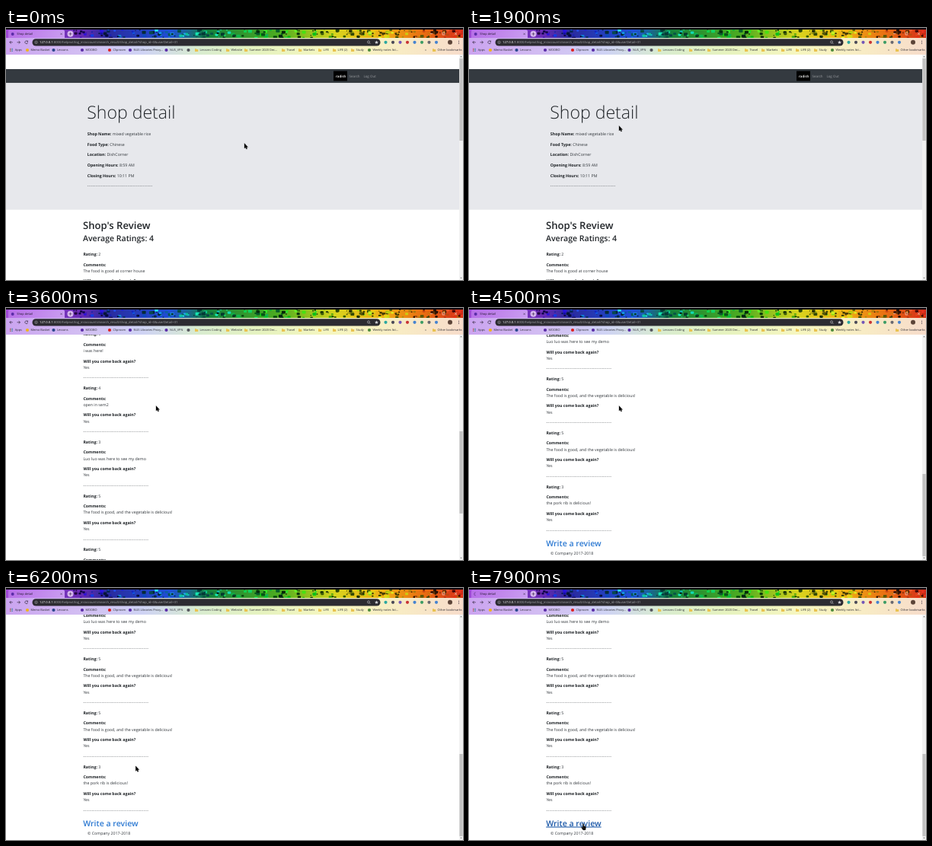
These frames come from a looping animation (600x331 px, 8 s). An HTML page:

```html
<!DOCTYPE html>
<html lang="en">
<head>
<meta charset="utf-8">
<title>Shop detail</title>
<style>
  html, body { margin: 0; width: 100%; height: 100%; overflow: hidden; background: #fff; }
  svg { display: block; width: 100vw; height: 100vh; }
  text { font-family: "Open Sans", "Noto Sans", sans-serif; font-size: 5.27px; fill: #30353a; text-rendering: geometricPrecision; }
  .b { font-weight: 700; fill: #1c2024; }
  .title { font-size: 23.1px; font-weight: 300; fill: #212529; }
  .h1 { font-size: 13.1px; font-weight: 600; fill: #212529; }
  .h2 { font-size: 10.55px; font-weight: 600; fill: #212529; }
  .dash { letter-spacing: .51px; }
  .nav { font-size: 4.45px; fill: #9a9da0; }
  .user { font-size: 4.45px; font-weight: 600; fill: #fff; }
  .tab { font-size: 4px; fill: #241a30; }
  .mark { font-size: 3.9px; fill: #2c2c34; }
  .url { font-size: 4.2px; fill: #a5a7ab; }
  .host { fill: #fff; }
</style>
</head>
<body>
<svg viewBox="0 0 600 331" preserveAspectRatio="none">
  <defs>
    <clipPath id="view"><rect y="35" width="600" height="296"/></clipPath>
    <linearGradient id="rainbow">
      <stop offset="0" stop-color="#a04ad8"/><stop offset=".16" stop-color="#6a2cb4"/>
      <stop offset=".22" stop-color="#2a2a9c"/><stop offset=".36" stop-color="#1f4fd8"/>
      <stop offset=".44" stop-color="#14803c"/><stop offset=".6" stop-color="#4fae20"/>
      <stop offset=".72" stop-color="#d8d41e"/><stop offset=".82" stop-color="#eeb014"/>
      <stop offset=".91" stop-color="#ea7012"/><stop offset="1" stop-color="#d42a18"/>
    </linearGradient>
    <linearGradient id="pastel">
      <stop offset="0" stop-color="#cba4f0"/><stop offset=".16" stop-color="#d2bdf2"/>
      <stop offset=".3" stop-color="#cfd3f4"/><stop offset=".42" stop-color="#d8ecd0"/>
      <stop offset=".56" stop-color="#e6f3bf"/><stop offset=".72" stop-color="#f6f6c0"/>
      <stop offset=".86" stop-color="#f8ecc4"/><stop offset="1" stop-color="#f7dccb"/>
    </linearGradient>
    <linearGradient id="tabFill">
      <stop offset="0" stop-color="#b870e8"/><stop offset="1" stop-color="#c99cf0"/>
    </linearGradient>
  </defs>
  <rect width="600" height="331" fill="#fff"/>
  <g clip-path="url(#view)"><g id="page"></g></g>
  <g id="scrollbar"></g>
  <g id="browser"></g>
  <path id="arrow" d="M0 0V6.6L1.5 5.3L2.5 7.6L3.7 7.1L2.7 4.9H4.6Z" fill="#000" stroke="#000" stroke-width=".3"/>
  <path id="hand" d="M-.5-3.6Q.3-4.3 .8-3.5V-.9L3-.3Q3.7 0 3.5 1L2.9 4.4H-.2L-2.5 1.2Q-2.4 .2-1.5 .6L-.6 1.3Z" fill="#111" stroke="#111" stroke-width=".3"/>
</svg>
<script>
const LOOP = 8000, MAX_SCROLL = 487;
const HOVER_AT = 6500, LOADING_AT = 7300;
const $ = id => document.getElementById(id);

function add(parent, tag, attrs, content) {
  const el = document.createElementNS('http://www.w3.org/2000/svg', tag);
  for (const key in attrs) el.setAttribute(key, attrs[key]);
  if (content) el.textContent = content;
  parent.appendChild(el);
  return el;
}
const rect = (g, x, y, width, height, fill, rx = 0) => add(g, 'rect', { x, y, width, height, fill, rx });
const dot = (g, cx, cy, r, fill) => add(g, 'circle', { cx, cy, r, fill });
const line = (g, d, stroke = '#33283d', width = .7) =>
  add(g, 'path', { d, stroke, 'stroke-width': width, fill: 'none' });
const text = (g, x, y, content, cls = '') => add(g, 'text', { x, y, class: cls }, content);

function field(g, x, y, label, value) {
  const el = text(g, x, y, '');
  add(el, 'tspan', { class: 'b' }, label + ': ');
  add(el, 'tspan', {}, value);
}

function seeded(seed) {
  return () => (seed = (seed * 16807) % 2147483647) / 2147483647;
}

function buildPage() {
  const g = $('page'), dashes = '-'.repeat(39);
  rect(g, 0, 54, 595, 18.3, '#343a40');
  rect(g, 430, 56.5, 18, 13, '#000');
  text(g, 433, 64.8, 'radish', 'user');
  text(g, 450.6, 64.8, 'Search', 'nav');
  text(g, 469.4, 64.8, 'Log Out', 'nav');

  rect(g, 0, 72.3, 595, 166.4, '#e7e8ec');
  text(g, 106.2, 119, 'Shop detail', 'title');
  [['Shop Name', 'mixed vegetable rice'], ['Food Type', 'Chinese'], ['Location', 'DishCorner'],
   ['Opening Hours', '8:59 AM'], ['Closing Hours', '10:11 PM']]
    .forEach(([label, value], i) => field(g, 106.8, 141.1 + i * 13.65, label, value));
  text(g, 106.8, 209.4, dashes, 'dash');

  text(g, 101, 263.6, "Shop's Review", 'h1');
  text(g, 101, 279.8, 'Average Ratings: 4', 'h2');
  const good = 'The food is good, and the vegetable is delicious!';
  const reviews = [[2, 'The food is good at corner house'], [3, 'i was here!'], [4, 'open in sem2'],
    [3, 'Luo luo was here to see my demo'], [5, good], [5, good], [3, 'the pork rib is delicious!']];
  reviews.forEach(([rating, comment], i) => {
    const y = 299 + i * 70.75, x = 101.4;
    field(g, x, y, 'Rating', rating);
    text(g, x, y + 13.6, 'Comments:', 'b');
    text(g, x, y + 21.8, comment);
    text(g, x, y + 35.4, 'Will you come back again?', 'b');
    text(g, x, y + 43.6, 'Yes');
    text(g, x, y + 57.2, dashes, 'dash');
  });
  const link = text(g, 101.2, 799.5, 'Write a review', 'h2');
  text(g, 107, 810.7, '© Company 2017-2018');
  return link;
}

function buildScrollbar() {
  const g = $('scrollbar');
  rect(g, 595, 35, 5, 296, '#f1f1f1');
  add(g, 'path', { d: 'M596.3 38.2L597.5 36.8L598.7 38.2ZM596.3 327.8L597.5 329.2L598.7 327.8Z', fill: '#6a6a6a' });
  return rect(g, 595.4, 40, 4.2, 108, '#c1c1c1');
}

// Rainbow backdrop, violet to red, spattered with dark and bright blots.
function buildTheme(g) {
  const random = seeded(77);
  rect(g, 0, 0, 600, 14, 'url(#rainbow)');
  for (let i = 0; i < 260; i++) {
    const x = 88 + random() * 510, y = 1 + random() * 11, size = 1 + random() * 3;
    const hue = 285 * (1 - x / 600) + random() * 40 - 10;
    const light = random() < .5 ? 8 + random() * 12 : 35 + random() * 20;
    rect(g, x, y, size * 1.3, size, `hsl(${hue} 85% ${light}%)`, .8);
  }
  rect(g, 0, 0, 600, 2, '#08060c');
}

function buildBrowser() {
  const g = $('browser');
  buildTheme(g);
  rect(g, 3, 2.5, 74, 12, 'url(#tabFill)', 2);
  text(g, 14.2, 9.3, 'Shop detail', 'tab');
  line(g, 'M71.5 6.7L73.7 8.9M73.7 6.7L71.5 8.9', '#33283d', .5);
  dot(g, 84.5, 7.8, 4, '#d6b7ee');
  line(g, 'M82.5 7.8H86.5M84.5 5.8V9.8', '#33283d', .6);
  line(g, 'M557 7.5H560M573 6H576V9H573ZM589 6L592 9M592 6L589 9', '#fff', .5);

  rect(g, 0, 13, 600, 22, 'url(#pastel)');
  line(g, 'M8.8 18.8H4.8M6.6 17L4.8 18.8L6.6 20.6M14.5 18.8H18.5M16.7 17L18.5 18.8L16.7 20.6');
  rect(g, 34.5, 14.2, 457, 9.4, '#2c2b31', 4.7);
  add(g, 'circle', { cx: 39.6, cy: 18.8, r: 1.7, fill: 'none', stroke: '#b9babd', 'stroke-width': .5 });
  line(g, 'M39.6 18.4V19.8', '#b9babd', .5);
  const url = text(g, 44, 20.3, '', 'url');
  add(url, 'tspan', { class: 'host' }, '127.0.0.1');
  add(url, 'tspan', {}, ':8000/helpnxt/log_in/accounts/search_result/shop_detail/?shop_id=3&userDetail=31');
  add(g, 'circle', { cx: 476, cy: 18.4, r: 1.5, fill: 'none', stroke: '#d0d0d4', 'stroke-width': .6 });
  line(g, 'M477 19.5L478.4 20.9', '#d0d0d4', .6);
  add(g, 'path', { d: 'M486.5 16.4L487.2 18.1H489L487.6 19.2L488.1 21L486.5 20L484.9 21L485.4 19.2L484 18.1H485.8Z', fill: '#d0d0d4' });
  ['#2aa8a0', '#4a4a58', '#7357b8', '#c93434', '#4583d0', '#3c9c64', '#686870', '#4583d0']
    .forEach((fill, i) => dot(g, 498.5 + i * 9.5, 18.8, 2.1, fill));
  dot(g, 583, 18.8, 3, '#5c4438');
  [17, 18.8, 20.6].forEach(y => dot(g, 594.5, y, .5, '#33283d'));

  for (let i = 0; i < 9; i++)
    rect(g, 5 + i % 3 * 1.5, 26.8 + Math.floor(i / 3) * 1.5, 1, 1, ['#c84848', '#3f8f56', '#4878c8'][i % 3]);
  text(g, 11.8, 30.3, 'Apps', 'mark');
  [[28, '#f0b41c', 'Memo Basket'], [62.5, '#28468c', 'Lessons'], [100, '#5a2ca8', 'MODBO'],
   [136, '#e02020', 'Cliproom'], [163, '#5a2ca8', 'NUS Libraries Proxy...'], [210.5, '#5a2ca8', 'NUS_VPN'],
   [239.5, '#55555e', ''], [477, '#4c8a3a', 'Weekly notes list...']]
    .forEach(([x, fill, label]) => {
      dot(g, x, 29, 2.1, fill);
      text(g, x + 4.6, 30.3, label, 'mark');
    });
  [[250, 'Lessons Coding'], [291, 'Website'], [315, 'Summer 2020 Dec...'], [364, 'Travel'], [386, 'Markets'],
   [412, 'LIFE'], [431, 'LIFE (2)'], [455, 'Study'], [562, 'Other bookmarks']]
    .forEach(([x, label]) => {
      add(g, 'path', { d: `M${x - 2} 27.2h1.6l.6 .7h2v3h-4.2z`, fill: '#e9c352' });
      text(g, x + 4.6, 30.3, label, 'mark');
    });
  text(g, 550, 30.3, '»', 'mark');

  return {
    icon: dot(g, 8.7, 7.9, 2, '#5a2ca8'),
    spinner: line(g, 'M8.7 6A1.9 1.9 0 0 0 8.7 9.8', '#4a2a70', .6),
    reload: line(g, 'M28.3 17.6A1.9 1.9 0 1 0 28.6 19.3M28.6 16.6V18H27.2'),
    stop: line(g, 'M25.3 17.3L28.3 20.3M28.3 17.3L25.3 20.3')
  };
}

// Eased interpolation through [time, value, value...] keys.
function track(keys, t) {
  const next = keys.findIndex(key => key[0] > t);
  if (next === 0) return keys[0].slice(1);
  if (next < 0) return keys[keys.length - 1].slice(1);
  const from = keys[next - 1], to = keys[next];
  const p = (t - from[0]) / (to[0] - from[0]), e = p * p * (3 - 2 * p);
  return from.slice(1).map((value, i) => value + (to[i + 1] - value) * e);
}

const pointerKeys = [[300, 313, 151.5], [1200, 162, 127], [1400, 162, 127], [1900, 197, 128.5],
  [5600, 197, 128.5], [6700, 150, 313.5]];
const scrollKeys = [[1950, 0], [2550, 127.8], [2750, 127.8], [3500, 333.5], [3700, 333.5], [4500, MAX_SCROLL]];

const link = buildPage(), thumb = buildScrollbar(), status = buildBrowser();
const show = (el, visible) => el.setAttribute('visibility', visible ? 'visible' : 'hidden');

function draw(t) {
  const [scroll] = track(scrollKeys, t), [x, y] = track(pointerKeys, t);
  $('page').setAttribute('transform', `translate(0 ${-scroll})`);
  thumb.setAttribute('y', 40 + scroll / MAX_SCROLL * 178);

  const hover = t >= HOVER_AT, loading = t >= LOADING_AT;
  link.style.fill = hover ? '#1b58a8' : '#2c79d2';
  link.style.textDecoration = hover ? 'underline' : 'none';
  for (const id of ['arrow', 'hand']) {
    $(id).setAttribute('transform', `translate(${x} ${y})`);
    show($(id), (id === 'hand') === hover);
  }
  show(status.icon, !loading);
  show(status.reload, !loading);
  show(status.spinner, loading);
  show(status.stop, loading);
  status.spinner.setAttribute('transform', `rotate(${-(t - 7900) * .36} 8.7 7.9)`);
}

const start = performance.now();
function tick() {
  draw((performance.now() - start) % LOOP);
  requestAnimationFrame(tick);
}
tick();
</script>
</body>
</html>
```
